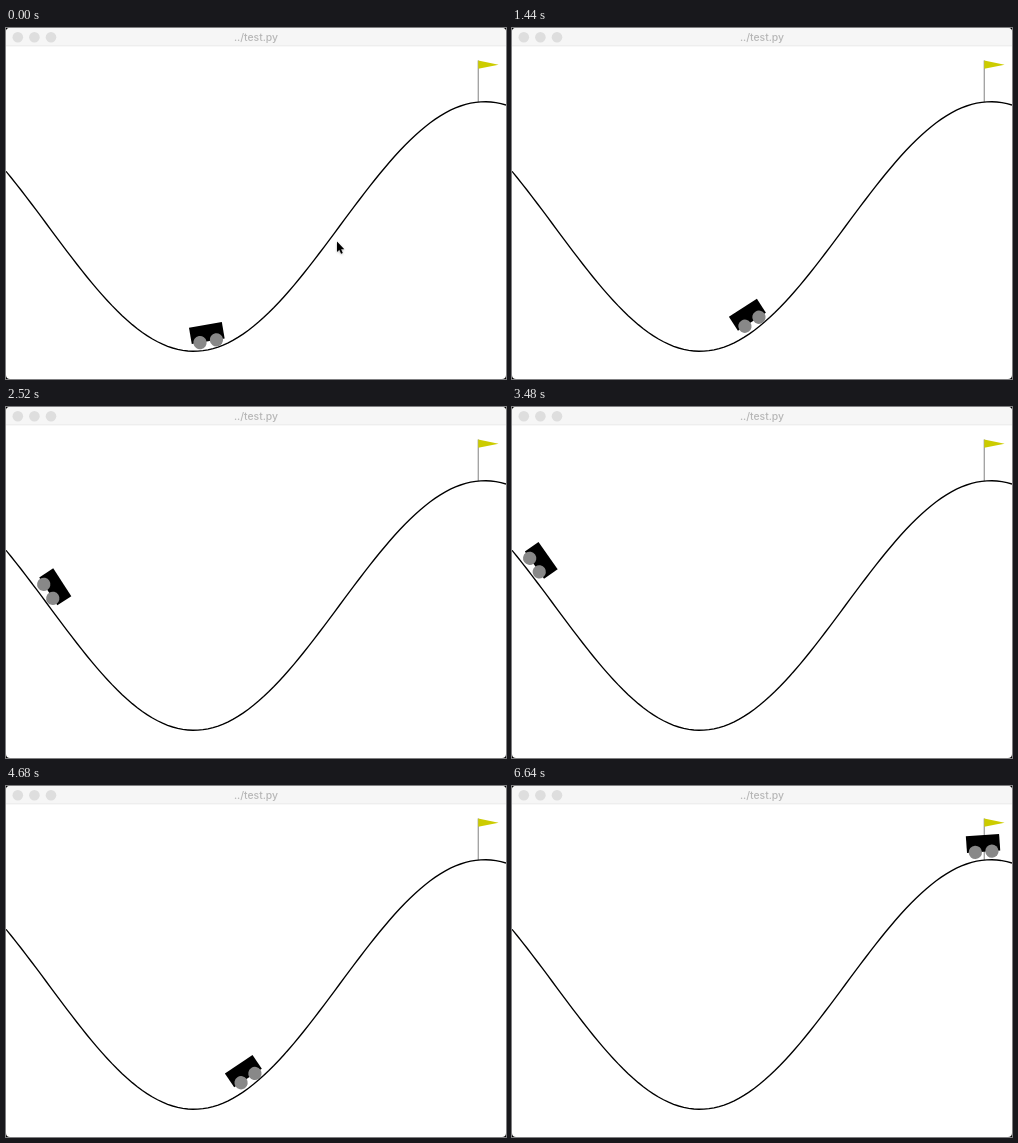
Write an HTML page that moves like this. It is 500x351 px and loops after 6680 ms.

```html
<!DOCTYPE html>
<html lang="en">
<head>
<meta charset="utf-8">
<title>Mountain car</title>
<style>
  html, body { margin: 0; width: 100%; height: 100%; overflow: hidden; background: #000; }
  svg { display: block; width: 500px; height: 351px; }
  text { font: 500 10.4px Inter, "Liberation Sans", sans-serif; fill: #b6b6b6; }
  #cursor { filter: drop-shadow(0 1px 1px #0005); }
</style>
</head>
<body>
<svg viewBox="0 0 500 351">
  <rect width="500" height="351" rx="4" fill="#fff"/>
  <path d="M0 18.3V4a4 4 0 0 1 4-4H496a4 4 0 0 1 4 4V18.3z" fill="#f6f6f6"/>
  <path d="M0 17.8H500" stroke="#ececec"/>
  <g fill="#dedede">
    <circle cx="11.8" cy="9.2" r="5.3"/>
    <circle cx="28.4" cy="9.2" r="5.3"/>
    <circle cx="45" cy="9.2" r="5.3"/>
  </g>
  <text x="250" y="13.4" text-anchor="middle">../test.py</text>

  <!-- 600 x 400 scene, y up -->
  <g transform="translate(0 351) scale(.83333 -.83175)">
    <polyline id="hill" fill="none" stroke="#000" stroke-width="1.62"/>
    <g id="car">
      <rect x="-20" y="10" width="40" height="20"/>
      <circle cx="10" cy="10" r="8" fill="#888"/>
      <circle cx="-10" cy="10" r="8" fill="#888"/>
    </g>
    <g id="flag">
      <path d="M0 0V50" stroke="#000" stroke-width=".6"/>
      <path d="M0 50V40L24.5 45z" fill="#cccc00"/>
    </g>
  </g>
  <path id="cursor" transform="translate(331 213.6) scale(.85)"
    d="M0 0v12.2l2.8-2.6 2 4.6 2-.9-2-4.4h3.8z"/>
</svg>
<script>
  const LOOP = 6680, START = 120, STEP = 60, TICK = 40;
  const LEFT = -1.2, WIDTH = 1.8, GOAL = 0.5, SCALE = 600 / WIDTH;
  const byId = id => document.getElementById(id);
  const car = byId('car'), cursor = byId('cursor');

  const place = x => [(x - LEFT) * SCALE, (0.45 * Math.sin(3 * x) + 0.55) * SCALE];

  // Where the car is at a few moments (ms)
  const keys = [
    [65, -0.467], [440, -0.303], [940, -0.198], [1440, -0.32],
    [2520, -1.073], [3130, -1.189], [4200, -0.778], [4680, -0.312],
    [4920, -0.064], [5640, 0.3405], [6600, GOAL]
  ];

  const slope = ([t0, x0], [t1, x1]) => (x1 - x0) / (t1 - t0);

  // Speed at a key: slope of the parabola through it and its neighbours
  function speed(i) {
    const before = keys[i - 1], here = keys[i], after = keys[i + 1];
    if (!before) return slope(here, after);
    if (!after) return slope(before, here);
    return slope(before, here) + slope(here, after) - slope(before, after);
  }

  function position(t) {
    const next = keys.findIndex(([time]) => time >= t);
    if (next < 1) return keys[next < 0 ? keys.length - 1 : 0][1];
    const [t0, x0] = keys[next - 1], [t1, x1] = keys[next];
    const span = t1 - t0, u = (t - t0) / span, w = 1 - u;
    return x0 * w * w * (1 + 2 * u) + x1 * u * u * (3 - 2 * u)
      + span * u * w * (speed(next - 1) * w - speed(next) * u);
  }

  // The car moves every STEP, seen at the next screen TICK
  function shownTime(t) {
    const seen = step => Math.ceil(step * STEP / TICK) * TICK;
    const step = Math.floor(t / STEP);
    return seen(step) <= t ? seen(step) : seen(step - 1);
  }

  function draw(t) {
    const x = position(t < START ? 0 : shownTime(t));
    const tilt = Math.cos(3 * x) * 180 / Math.PI;
    car.setAttribute('transform', `translate(${place(x)}) rotate(${tilt})`);
    cursor.setAttribute('visibility', t < START ? 'visible' : 'hidden');
  }

  byId('flag').setAttribute('transform', `translate(${place(GOAL)})`);
  byId('hill').setAttribute('points',
    Array.from({ length: 100 }, (_, i) => place(LEFT + WIDTH * i / 99)).join(' '));

  const begin = performance.now();
  function frame() {
    draw((performance.now() - begin) % LOOP);
    requestAnimationFrame(frame);
  }
  frame();
</script>
</body>
</html>
```
